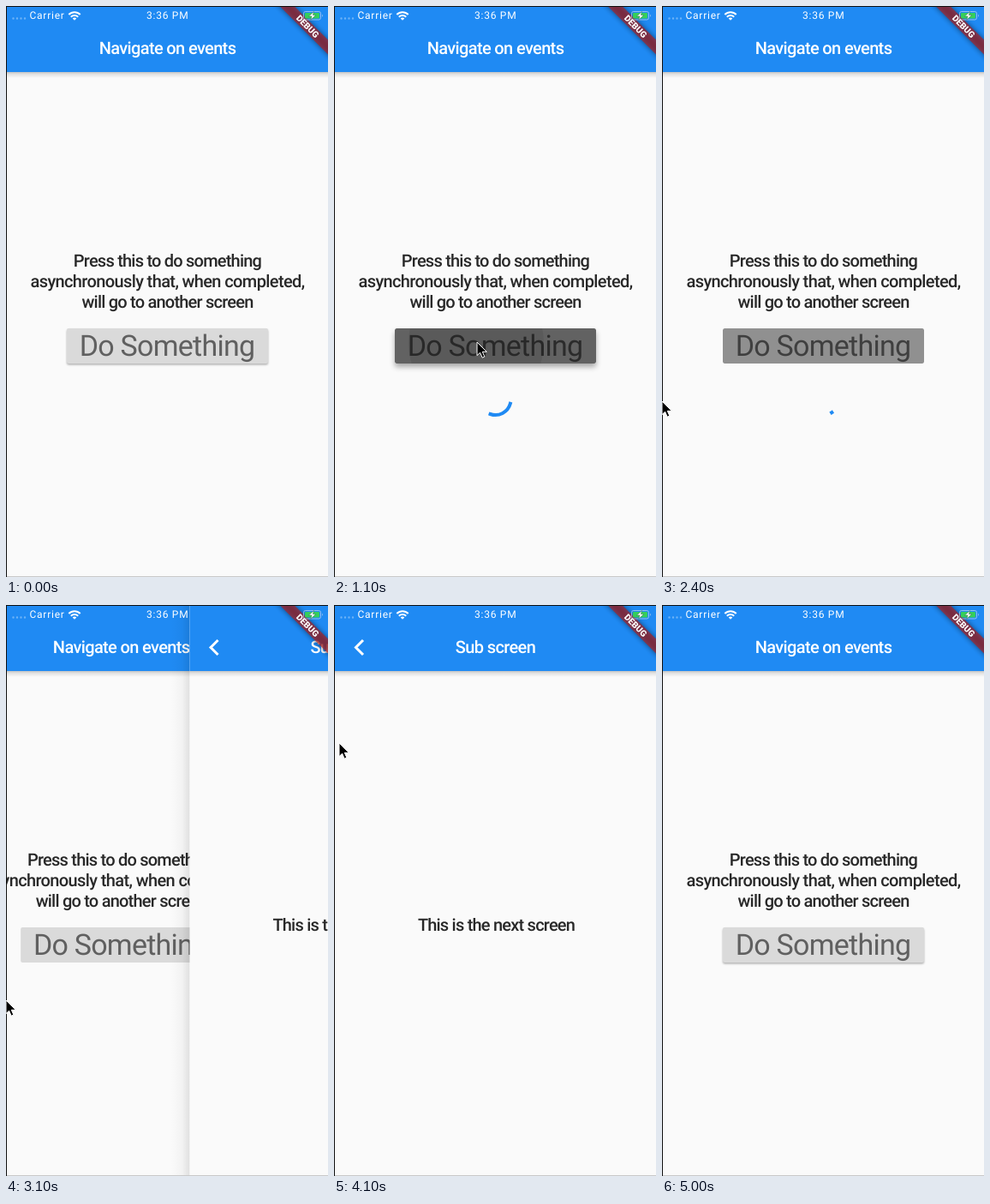
These frames come from a looping animation (376 by 666 pixels, 5.1 s). An HTML page:

```html
<!DOCTYPE html>
<html lang="en">
<head>
<meta charset="utf-8">
<title>Navigate on events</title>
<style>
  html, body { margin: 0; width: 100%; height: 100%; overflow: hidden; background: #fafafa; }
  svg { display: block; width: 376px; height: 666px; }
  text { font-family: Roboto, Inter, sans-serif; text-anchor: middle; text-rendering: geometricPrecision; }
  .title { font-size: 20px; font-weight: 500; fill: #fff; letter-spacing: -.64px; }
  .body { font-size: 20px; font-weight: 500; fill: #282828; letter-spacing: -.79px; }
  .status { font-size: 12px; fill: #fff; letter-spacing: .75px; text-anchor: start; }
</style>
</head>
<body>
<svg viewBox="0 0 376 666">
  <defs>
    <linearGradient id="barShade" x1="0" y1="0" x2="0" y2="1">
      <stop offset="0" stop-opacity=".22"/>
      <stop offset=".35" stop-opacity=".1"/>
      <stop offset="1" stop-opacity="0"/>
    </linearGradient>
    <linearGradient id="edgeShade">
      <stop offset="0" stop-opacity="0"/>
      <stop offset=".6" stop-opacity=".07"/>
      <stop offset="1" stop-opacity=".25"/>
    </linearGradient>
    <filter id="soft" x="-20%" y="-60%" width="140%" height="220%"><feGaussianBlur stdDeviation="1.2"/></filter>
    <filter id="softer" x="-20%" y="-60%" width="140%" height="220%"><feGaussianBlur stdDeviation="3"/></filter>
    <clipPath id="buttonClip"><use href="#button"/></clipPath>
    <rect id="button" x="71" y="376" width="235" height="41" rx="2"/>
    <rect id="ribbon" x="-60" y="28" width="120" height="12"/>
    <g id="page">
      <rect x="1" width="375" height="666" fill="#fafafa"/>
      <rect x="1" y="77" width="375" height="7" fill="url(#barShade)"/>
      <rect x="1" width="375" height="77" fill="#1f8af3"/>
    </g>
  </defs>

  <g id="main">
    <use href="#page"/>
    <text class="title" x="188.5" y="56">Navigate on events</text>
    <text class="body" x="188.5" y="304">Press this to do something</text>
    <text class="body" x="188.5" y="328" style="letter-spacing:-.62px">asynchronously that, when completed,</text>
    <text class="body" x="188.5" y="352">will go to another screen</text>
    <use id="lowShadow" href="#button" y="1.5" opacity=".3" filter="url(#soft)"/>
    <use id="highShadow" href="#button" y="4" opacity=".33" filter="url(#softer)"/>
    <use href="#button" fill="#dadada"/>
    <text x="188" y="408" font-size="34" fill="#606060" letter-spacing="-.75">Do Something</text>
    <g clip-path="url(#buttonClip)">
      <use id="highlight" href="#button"/>
      <circle id="ripple" cx="166" cy="393"/>
    </g>
    <path id="spinner" fill="none" stroke="#1f8af3" stroke-width="4" stroke-linecap="square"/>
  </g>

  <g id="sub">
    <rect id="edge" x="-21" width="22" height="666" fill="url(#edgeShade)"/>
    <use href="#page"/>
    <path d="M34 41 25.5 49.5 34 58" fill="none" stroke="#fff" stroke-width="3"/>
    <text class="title" x="188.5" y="56">Sub screen</text>
    <text class="body" x="189.5" y="380">This is the next screen</text>
  </g>

  <g transform="translate(376 0) rotate(45)">
    <use href="#ribbon" opacity=".5" filter="url(#softer)"/>
    <use href="#ribbon" fill="#b71c1c" fill-opacity=".63"/>
    <text y="37.2" font-size="10.2" font-weight="900" fill="#fff">DEBUG</text>
  </g>

  <g fill="#fff">
    <path d="M8.5 14.5H23" stroke="#fff" stroke-width="2.4" stroke-linecap="round" stroke-dasharray="0 4.5" opacity=".35"/>
    <text class="status" x="27.5" y="15.2">Carrier</text>
    <text class="status" x="164" y="15.2">3:36 PM</text>
    <path d="M73.3 10a9.4 9.4 0 0 1 13.4 0M75.8 12.8a5.9 5.9 0 0 1 8.4 0" fill="none" stroke="#fff" stroke-width="2"/>
    <path d="M77.7 14.5a3.3 3.3 0 0 1 4.6 0L80 16.8z"/>
    <rect x="347.5" y="6.5" width="20" height="9.5" rx="2.2" fill="none" stroke="#b9d3ea" stroke-opacity=".75"/>
    <rect x="349" y="8" width="17" height="6.5" rx="1" fill="#35cf5b"/>
    <path d="M369 9.5q1.6 1.8 0 3.6z" fill="#b9d3ea"/>
    <path d="M359.5 6.5 353.5 12H357l-1.2 4.2 6-5.6h-3.4z" stroke="#27623f" stroke-width=".5"/>
  </g>

  <path d="M0 0H376V1H1V666H0z" fill="#111"/>
  <rect x="1" y="665" width="375" height="1" fill="#c9c9c9"/>
  <path id="cursor" d="M0 0V15.6L3.6 12.3 6.2 18.2 8.8 17 6.3 11.3H11.3z" stroke="#fff" stroke-width="1"/>
</svg>
<script>
  const LOOP = 5100, STEP = 100, WIDTH = 375;
  const ENTER = 300, PRESS = 900, TAP = 1100, DONE = 3100, LEAVE = 5000;
  const PUSH = 3017, PUSH_TIME = 500, GRIP = 25, RELEASE = 4600;

  const el = id => document.getElementById(id);
  const clamp = v => Math.min(1, Math.max(0, v));
  const ramp = (t, from, to) => clamp((t - from) / (to - from));
  const smooth = k => k * k * (3 - 2 * k);

  function bezier(x1, y1, x2, y2) {
    const at = (p, q, s) => 3 * p * s * (1 - s) ** 2 + 3 * q * s * s * (1 - s) + s ** 3;
    return x => {
      if (x <= 0 || x >= 1) return clamp(x);
      let lo = 0, hi = 1;
      for (let i = 0; i < 24; i++) {
        const mid = (lo + hi) / 2;
        if (at(x1, x2, mid) < x) lo = mid; else hi = mid;
      }
      return at(y1, y2, lo);
    };
  }
  const fastOutSlowIn = bezier(.4, 0, .2, 1);
  const linearToEaseOut = bezier(.35, .91, .33, .97);

  // The pointer glides to the button, off the left edge, up, and then drags the page away.
  const glides = [
    { from: 250, to: 800, x: 167, y: 392 },
    { from: 1550, to: 2350, x: 0, y: 461 },
    { from: 3250, to: 4100, x: 6, y: 161 },
    { from: 4150, to: 4850, x: 338, y: 167 }
  ];
  function pointer(t) {
    return glides.reduce((p, { from, to, x, y }) => {
      const k = smooth(ramp(t, from, to));
      return { x: p.x + (x - p.x) * k, y: p.y + (y - p.y) * k };
    }, { x: 372, y: 580 });
  }

  function pageOffset(t, cursorX) {
    if (t < RELEASE - 500) return WIDTH * (1 - linearToEaseOut(ramp(t, PUSH, PUSH + PUSH_TIME)));
    const dragged = Math.max(0, cursorX - GRIP);
    return dragged + (WIDTH - dragged) * smooth(ramp(t, RELEASE, LEAVE));
  }

  function spinnerPath(t) {
    const cycle = (t - 2400) / 1000 + 4.01;
    const step = Math.floor(cycle) % 5, phase = cycle % 1;
    const head = fastOutSlowIn(clamp(phase * 2));
    const tail = fastOutSlowIn(clamp(phase * 2 - 1));
    const start = Math.PI * (-.5 + tail * 1.5 + phase * 1.7 - step * .8);
    const sweep = Math.max((head - tail) * 1.5 * Math.PI, .01);
    const point = a => `${188.5 + 18 * Math.cos(a)} ${459 + 18 * Math.sin(a)}`;
    return `M${point(start)}A18 18 0 ${sweep > Math.PI ? 1 : 0} 1 ${point(start + sweep)}`;
  }

  const set = (id, name, value) => el(id).setAttribute(name, value);
  const show = (id, on) => set(id, 'visibility', on ? 'visible' : 'hidden');
  const move = (id, x, y) => set(id, 'transform', `translate(${x} ${y})`);

  function render(t) {
    const cursor = pointer(t);
    move('cursor', cursor.x, cursor.y);
    show('cursor', t >= ENTER && t < LEAVE);

    const offset = pageOffset(t, cursor.x);
    move('main', (offset - WIDTH) / 3, 0);
    move('sub', offset, 0);
    set('edge', 'opacity', 1 - offset / WIDTH);
    show('sub', offset < WIDTH);

    const flash = clamp(1 - Math.abs(t - TAP) / 300);
    const held = ramp(t, PRESS, TAP);
    set('highlight', 'opacity', t < DONE ? .34 * held + .21 * flash : 0);
    set('ripple', 'r', Math.max(0, t - PRESS) * .395);
    set('ripple', 'opacity', .08 * (1 - ramp(t, TAP, TAP + 200)));
    set('highShadow', 'opacity', .33 * flash);
    show('lowShadow', t < TAP || t > DONE);

    const busy = t >= TAP && t < DONE;
    show('spinner', busy);
    if (busy) set('spinner', 'd', spinnerPath(t));
  }

  const origin = performance.now();
  function tick() {
    const t = (performance.now() - origin) % LOOP;
    render(Math.floor(t / STEP) * STEP);
    requestAnimationFrame(tick);
  }
  tick();
</script>
</body>
</html>
```
